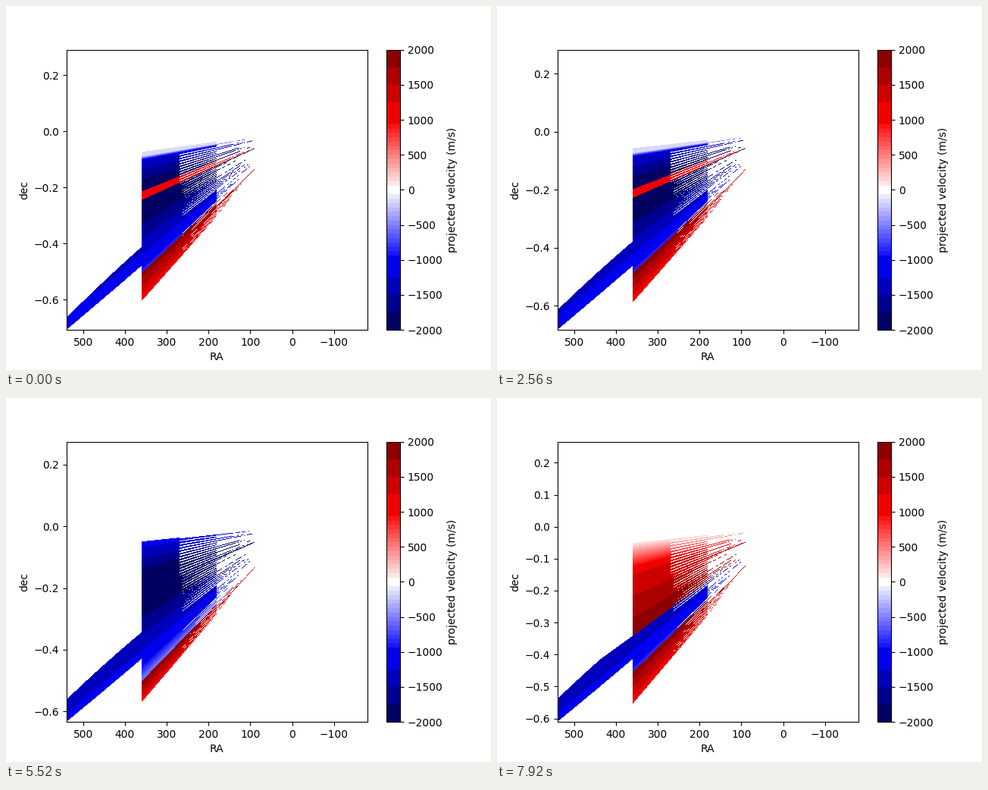
A matplotlib script that plays this animation: 640 by 480 pixels, repeating every 8000 ms.

```python
import numpy as np
import matplotlib.pyplot as plt
from matplotlib.animation import FuncAnimation
from matplotlib.cm import ScalarMappable
from matplotlib.colors import BoundaryNorm, ListedColormap

FRAMES, INTERVAL = 100, 80
LEFT, RIGHT = 539.3, -180
W, H = 397, 370

# All rays meet at RA 0, dec 0. A ray is named by its depth below zero at
# RA 360, plus the common drift since the start.
DRIFT = 0.0063
ROW = 0.0125
FAN_END = 0.605
SPINE = 0.247

# Times (s) at which whole groups of rays change
TAIL_WIDENS, STRIPE_ENDS, LIGHT_ENDS, TOP_FLIPS = 1.36, 4.4, 5.1, 6.9

rng = np.random.default_rng(7)
thickness, reach, kept = rng.random((3, 64))
dashes = rng.random((64, 128))


def phase(t):
    """First ray of the fan and first ray of its red lower part."""
    if t < STRIPE_ENDS:
        return .074, .504
    if t < LIGHT_ENDS:
        return .074, .554
    if t < TOP_FLIPS:
        return .0853, .537
    return .1014, .506


def tail_limits(t, ra):
    to_fan = (540 - ra) / 180
    steps = (t >= TAIL_WIDENS) + (t >= LIGHT_ENDS)
    upper = .443 - .0167 * steps - .031 * to_fan
    lower = .4716 - .0143 * (t >= LIGHT_ENDS) + .0075 * to_fan
    return upper, lower


def dec_limits(t):
    lowest = tail_limits(t, 540)[1]
    return -1.5 * (lowest - DRIFT * t), .2915 - .0032 * t


def velocity(ray, t):
    first, red = phase(t)
    top_speed = -150 if t < LIGHT_ENDS else -1250
    v = np.interp(ray, [.09, .105, .2, .29, .48, .56],
                  [top_speed, -1250, -1950, -1950, -1050, -300])
    if t < STRIPE_ENDS:
        v[np.abs(ray - .23) < .015] = 1000
    if t >= TOP_FLIPS:
        v = np.where(ray < .392, np.interp(ray, [.1, .2, .392], [70, 1250, 1950]), v)
    v = np.where(ray > red, np.interp(ray, [red, FAN_END], [1950, 1050]), v)
    v[(ray < first) | (ray > FAN_END)] = np.nan
    return v


def fan_mask(ray, ra, t, pixel):
    """Solid at first, then single rays that narrow and break into dashes."""
    solid = np.abs(ray - .455) < .04
    if t < LIGHT_ENDS:
        solid |= ray < .105
    edge = np.where(solid, 180, np.where(ray < .25, 270, 262))

    row = np.clip(ray / ROW, 0, 63).astype(int)
    past = np.clip((edge - ra) / 90, 0, 1)
    fill = np.where(ray < .25, .62 - .15 * past, 1 - .5 * past)
    fill = np.where(ra < 180, 0, fill * (.75 + .5 * thickness[row]))
    off_center = np.abs(ray / ROW % 1 - .5) * ROW
    stripe = off_center < np.maximum(fill * ROW, pixel) / 2

    upper = ray < SPINE
    dash = dashes[row, np.clip(ra / 4, 0, 127).astype(int)]
    broken = dash > np.where(upper, 1.2, .9) - (180 - ra) / 120
    end = 90 + np.where(upper, 40, 75) * reach[row]
    long_ray = (kept[row] < .65) & (ra > end) & ~broken

    shown = (ra > edge) | (stripe & ((ra >= 180) | long_ray))
    for center in SPINE, phase(t)[1] + .035:
        shown |= (np.abs(ray - center) < pixel / 2) & (ra < 230)
    return shown & (ra >= 90)


def render(t):
    bottom, top = dec_limits(t)
    dec = top - (np.arange(H)[:, None] + .5) * (top - bottom) / H
    ray = -dec * 360 / ra_safe + DRIFT * t
    pixel = (top - bottom) / H * 360 / np.maximum(ra_safe, 90)
    v = velocity(ray, t)

    upper, lower = tail_limits(t, ra_safe)
    tail = (ray > upper) & (ray < lower) & (v < 0)
    shown = np.where(ra_safe > 360, tail, fan_mask(ray, ra_safe, t, pixel))
    rgba = cmap(norm(np.nan_to_num(v)))
    rgba[~shown | np.isnan(v)] = 1
    return rgba


fine = np.arange(-937.5, 938, 62.5)
fine = fine[fine != 0]
coarse = np.arange(1250, 2001, 250)
levels = np.concatenate([-coarse[::-1], fine, coarse])
middles = (levels[1:] + levels[:-1]) / 2
cmap = ListedColormap(plt.get_cmap("seismic")((middles + 2000) / 4000))
norm = BoundaryNorm(levels, cmap.N)

fig, ax = plt.subplots(figsize=(6.4, 4.8), dpi=100)
bar = fig.colorbar(ScalarMappable(norm, cmap), ax=ax, spacing="proportional",
                   ticks=np.arange(-2000, 2001, 500),
                   label="projected velocity (m/s)")
bar.minorticks_off()
picture = ax.imshow(np.ones((H, W, 4)), extent=(LEFT, RIGHT, -.7, .3),
                    aspect="auto", interpolation="nearest")
ax.set(xlim=(LEFT, RIGHT), xlabel="RA", ylabel="dec")

ra_line = LEFT - (np.arange(W) + .5) * (LEFT - RIGHT) / W
ra_safe = np.tile(np.maximum(ra_line, 1), (H, 1))


def draw(frame):
    t = frame * INTERVAL / 1000
    limits = dec_limits(t)
    picture.set_data(render(t))
    picture.set_extent((LEFT, RIGHT, *limits))
    ax.set_xlim(LEFT, RIGHT)
    ax.set_ylim(limits)
    return [picture]


anim = FuncAnimation(fig, draw, frames=FRAMES, interval=INTERVAL,
                     repeat=True, repeat_delay=0, blit=False)
plt.show()
```
